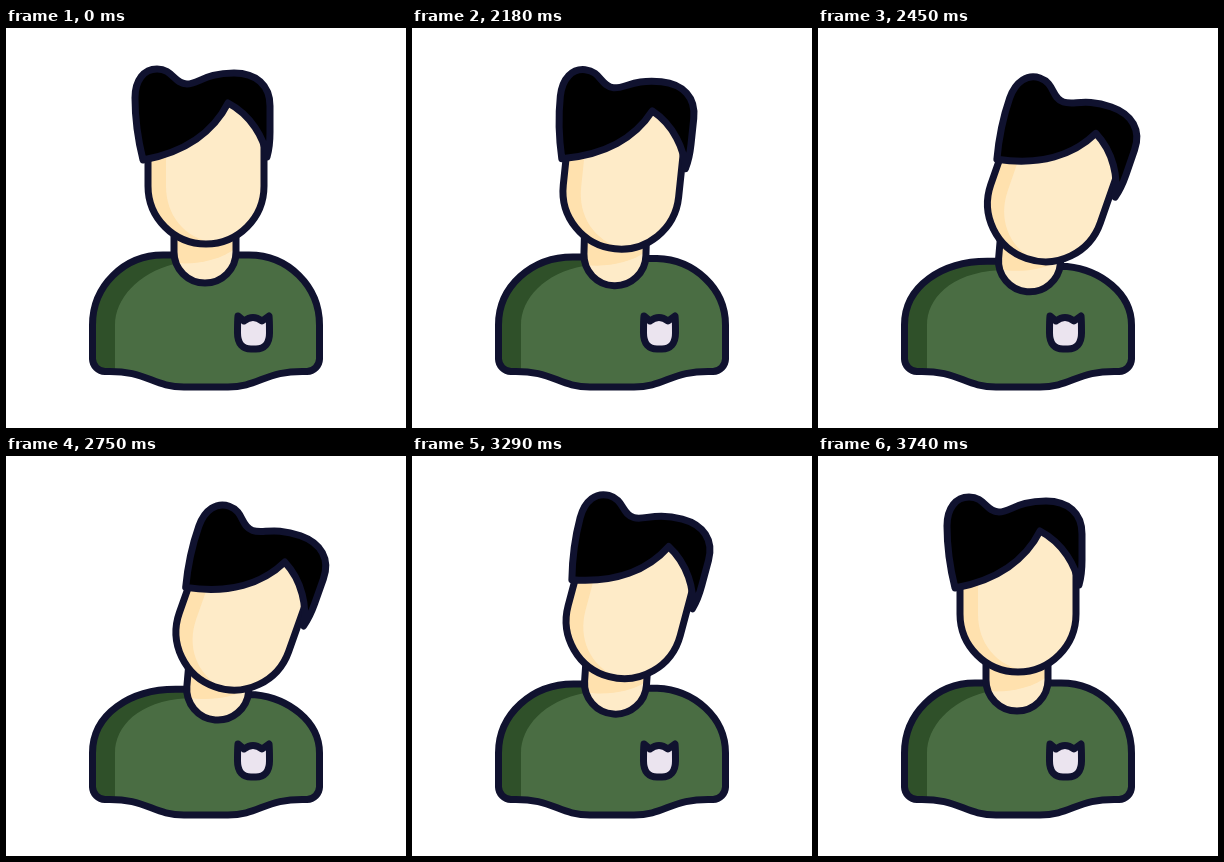
Write an HTML page that moves like this. It is 400 by 400 pixels and loops after 3770 ms.

```html
<!DOCTYPE html>
<html lang="en">
<head>
<meta charset="utf-8">
<title>Head tilt</title>
<style>
html, body { margin: 0; width: 100%; height: 100%; overflow: hidden; background: #fff; }
svg { display: block; width: 100%; height: 100%; }
.line { stroke: #10122f; stroke-width: 7; stroke-linejoin: round; stroke-linecap: round; }
.skin { fill: #feebc8; }
.shade { fill: #ffe1ae; }
</style>
</head>
<body>
<svg viewBox="0 0 400 400">
  <path id="shirt" fill="#4a6d43"/>
  <path id="shirtShade" fill="#2f5029"/>
  <path id="shirtLine" class="line" fill="none"/>
  <path class="line" fill="#ebe4ef" d="M232 288L238 293Q247 286 256 293L263 288Q263.500 292 263.500 305C263.500 316 258 321 250 321H245C237 321 231.500 316 231.500 305Q231.500 292 232 288Z"/>
  <g id="neck">
    <path class="skin" d="M168 190V224A31 31 0 0 0 230 224V190Z"/>
    <path class="shade" d="M168 190V224L170 235C190 237 215 232 230 220V190Z"/>
    <path class="line" fill="none" d="M168 190V224A31 31 0 0 0 230 224V190"/>
  </g>
  <g id="head">
    <g id="face">
      <path class="skin" d="M142 125V158A58 58 0 0 0 258 158V100L222 70Z"/>
      <path class="shade" d="M142 125V158A58 58 0 0 0 208 215C178 210 160 187 160 158V118Z"/>
      <path class="line" fill="none" d="M142 125V158A58 58 0 0 0 258 158V108"/>
    </g>
    <path class="line" d="M137 132C132 112 129 90 129 70C129 52 138 41 151 41C167 41 168 56 181 56C192 56 200 45 228 45C250 45 264 57 264 78V104C264 114 263 122 261 129C258 110 245 87 222 75C208 103 180 124 137 132Z"/>
  </g>
</svg>
<script>
const LOOP = 3770, TILT = 19.5, NECK_TILT = 5, FACE_SLIDE = -2.5, SHIFT = [12.5, 9];
const $ = id => document.getElementById(id);

function ease(t, from, to) {
  const x = Math.min(1, Math.max(0, (t - from) / (to - from)));
  return x * x * (3 - 2 * x);
}

// Rises with the lean, then returns over its own interval
const lean = (t, from, to) => ease(t, 2000, 2490) - ease(t, from, to);

function drawShirt(dx, dy, angle) {
  const a = angle * Math.PI / 180;
  const spread = 31 * Math.cos(a), drop = 31 * Math.sin(a);
  const lx = 199 + dx - spread, ly = 227 + dy - drop;
  const rx = 199 + dx + spread, ry = 227 + dy + drop;
  const sag = ry - 227;
  const left = `M${lx} ${ly}H${lx - 11}C${118 + dx / 2} ${ly} 86.5 258 86.5 297V331A13 13 0 0 0 99 343.5`;
  const outline = `${left}C140 342 147 359 178 359H222C253 359 260 342 301 343.5A13 13 0 0 0 313.5 331V297`
    + `C313.5 ${258 + sag * 0.6} 282 ${ry + sag * 0.3} ${243 + dx / 2} ${ry}L${rx} ${ry}`;
  $("shirt").setAttribute("d", outline + "Z");
  $("shirtLine").setAttribute("d", outline);
  $("shirtShade").setAttribute("d", `${left}H109V297C109 271 132 245 ${lx} ${ly + 9}Z`);
}

function frame() {
  const t = performance.now() % LOOP;
  const tilt = lean(t, 3150, 3600);
  const headMove = lean(t, 3080, 3290);
  const neckMove = lean(t, 3080, 3430);
  const [dx, dy] = SHIFT.map(s => s * neckMove);
  const [hx, hy] = SHIFT.map(s => s * headMove);
  drawShirt(dx, dy, NECK_TILT * tilt);
  $("neck").setAttribute("transform", `translate(${dx} ${dy}) rotate(${NECK_TILT * tilt} 199 227)`);
  $("head").setAttribute("transform", `translate(${hx} ${hy}) rotate(${TILT * tilt} 180 215)`);
  $("face").setAttribute("transform", `translate(${FACE_SLIDE * tilt})`);
  requestAnimationFrame(frame);
}
frame();
</script>
</body>
</html>
```
